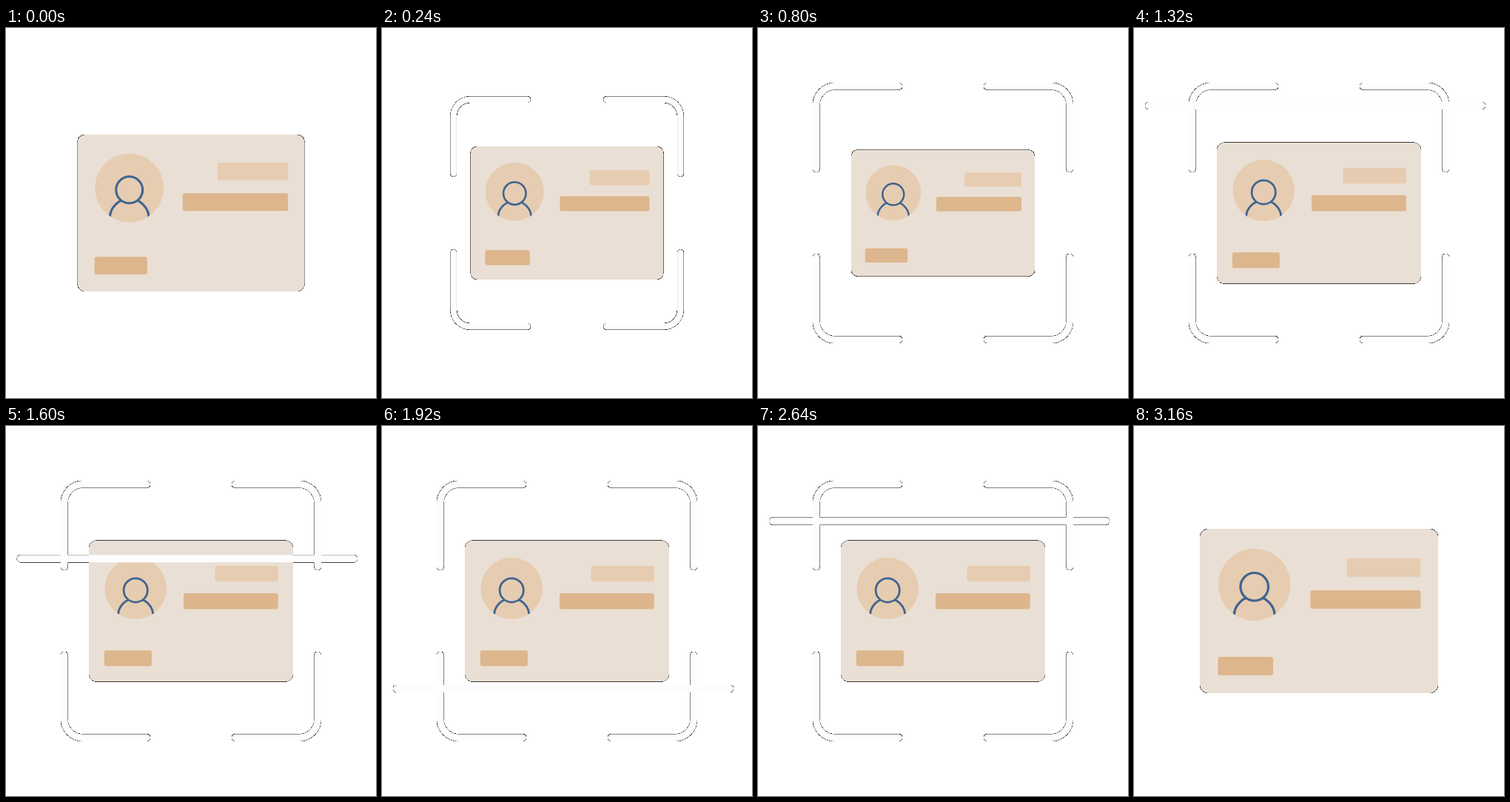
Write an HTML page with a canvas that moves like this. It is 500 px wide and 500 px high and loops after 3.88 s.

```html
<!DOCTYPE html>
<html lang="en">
<head>
<meta charset="utf-8">
<title>Card scan</title>
<style>
html, body { margin: 0; width: 100%; height: 100%; overflow: hidden; background: #fff; }
canvas { display: block; width: 500px; height: 500px; }
</style>
</head>
<body>
<canvas id="stage" width="500" height="500"></canvas>
<script>
const SIZE = 500, LOOP = 3880, STEP = 40;
const CARD = '#eadfd4', LIGHT = '#e6ccb1', DARK = '#ddb68d', BLUE = '#3e6491', WHITE = '#fdfdfd';
const ctx = document.getElementById('stage').getContext('2d', { willReadFrequently: true });

const span = (t, from, to) => Math.min(1, Math.max(0, (t - from) / (to - from)));
const mix = (a, b, u) => a + (b - a) * u;
const smooth = u => u * u * (3 - 2 * u);
const quartOut = u => 1 - (1 - u) ** 4;

function box(x, y, w, h, r, color) {
  ctx.beginPath();
  ctx.roundRect(x, y, w, h, r);
  ctx.fillStyle = color;
  ctx.fill();
}

function circle(x, y, r) {
  ctx.beginPath();
  ctx.arc(x, y, r, 0, Math.PI * 2);
}

// Runs draw() with the origin at the stage centre.
function centred(scale, draw) {
  ctx.save();
  ctx.translate(SIZE / 2, SIZE / 2);
  ctx.scale(scale, scale);
  draw();
  ctx.restore();
}

function drawBrackets() {
  const edge = 171.25, end = 59.75;
  ctx.strokeStyle = WHITE;
  ctx.lineWidth = 9.5;
  ctx.lineCap = 'round';
  for (const sx of [-1, 1]) {
    for (const sy of [-1, 1]) {
      ctx.beginPath();
      ctx.moveTo(sx * edge, sy * end);
      ctx.arcTo(sx * edge, sy * edge, sx * end, sy * edge, 25);
      ctx.lineTo(sx * end, sy * edge);
      ctx.stroke();
    }
  }
}

function drawAvatar() {
  const x = -87.3;
  ctx.save();
  circle(x, -35.6, 48.6);
  ctx.fillStyle = LIGHT;
  ctx.fill();
  ctx.clip();
  ctx.strokeStyle = BLUE;
  ctx.lineWidth = 3.2;
  circle(x, 7.6, 27.7);
  ctx.stroke();
  circle(x, -32.7, 18.8);
  ctx.fill();
  ctx.stroke();
  ctx.restore();
}

function drawCard() {
  box(-161, -111.1, 322, 222.2, 12, CARD);
  drawAvatar();
  box(37.8, -71.2, 99.6, 24.9, 3, LIGHT);
  box(-11.8, -28.1, 149.2, 25.1, 3, DARK);
  box(-136.6, 62, 74.6, 25, 3, DARK);
}

function cardWidth(t) {
  if (t < 800) return mix(322, 248, quartOut(span(t, -43, 757)));
  if (t < 2880) return mix(248, 276, span(t, 800, 960));
  return mix(276, 322, span(t, 2880, 3160));
}

function bracketScale(t) {
  return t < 2880
    ? mix(0.4, 1, quartOut(span(t, -43, 757)))
    : mix(1, 0.6, span(t, 2880, 3160));
}

function barY(t) {
  const u = t < 2080 ? span(t, 1360, 2080) : 1 - span(t, 2080, 2760);
  return mix(105, 391, smooth(u));
}

// Hard-edged transparency: partly covered pixels turn dark.
function hardenEdges() {
  const image = ctx.getImageData(0, 0, SIZE, SIZE), d = image.data;
  for (let i = 0; i < d.length; i += 4) {
    const a = d[i + 3];
    if (a === 255) continue;
    const k = a / 255;
    d[i] *= k;
    d[i + 1] *= k;
    d[i + 2] *= k;
    d[i + 3] = a < 12 ? 0 : 255;
  }
  ctx.putImageData(image, 0, 0);
}

function render(t) {
  ctx.clearRect(0, 0, SIZE, SIZE);
  if (t < 3160) centred(bracketScale(t), drawBrackets);
  centred(cardWidth(t) / 322, drawCard);
  if (t >= 1320 && t < 2800) box(15, barY(t) - 5, 460, 10, 5, WHITE);
  hardenEdges();
}

const start = performance.now();
let shown = -1;
function tick() {
  const t = Math.floor(((performance.now() - start) % LOOP) / STEP) * STEP;
  if (t !== shown) render(shown = t);
  requestAnimationFrame(tick);
}
tick();
</script>
</body>
</html>
```
